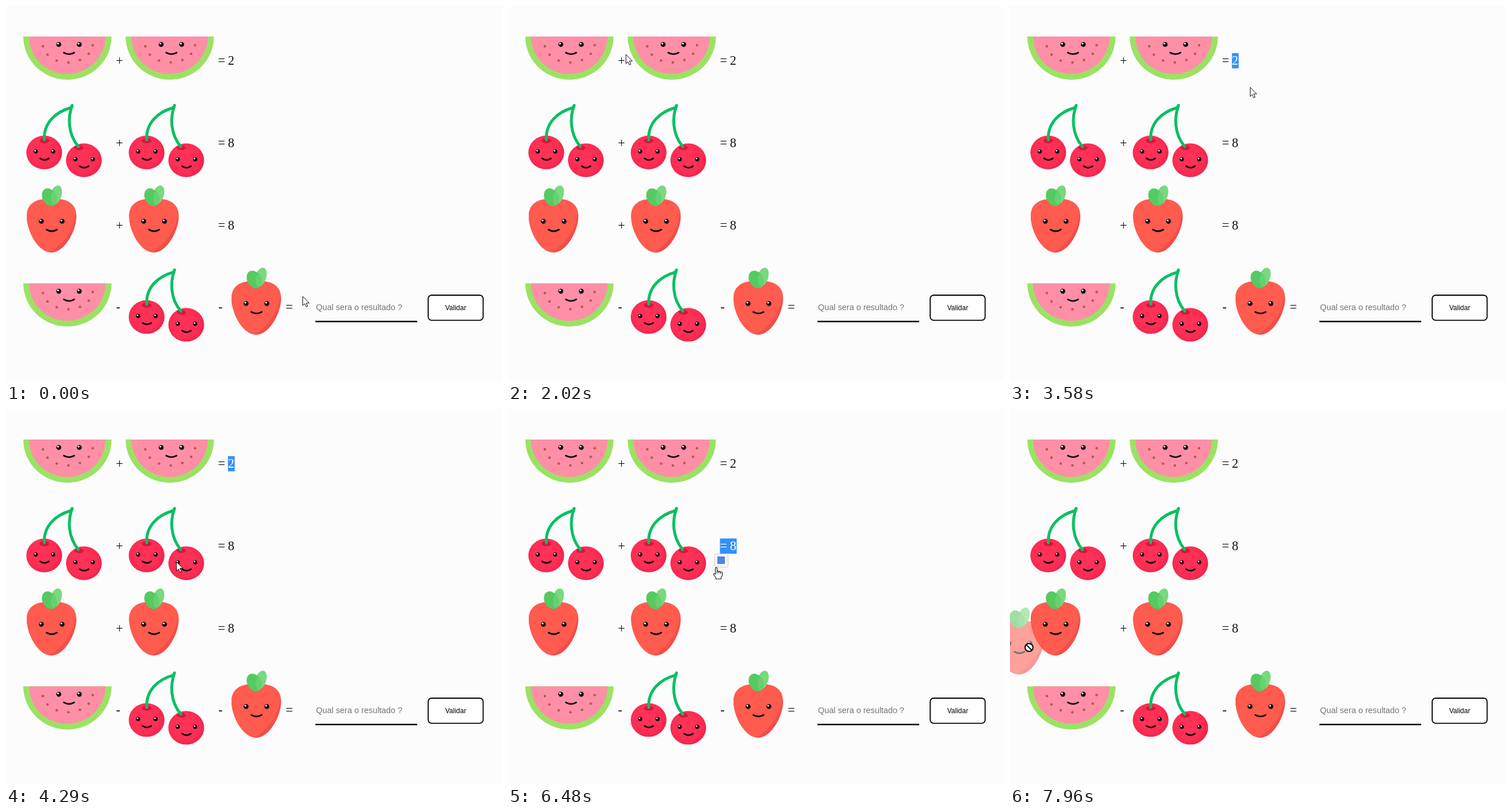
Recreate the animation shown at these times as an HTML page with a canvas. Size 860 px wide and 651 px high, loop 8000 ms.

```html
<!DOCTYPE html>
<html lang="pt">
<head>
<meta charset="utf-8">
<title>Fruit puzzle</title>
<style>
html, body { margin: 0; width: 100%; height: 100%; overflow: hidden; background: #fcfcfd; }
canvas { display: block; }
</style>
</head>
<body>
<canvas id="stage" width="860" height="651"></canvas>
<script>
const W = 860, H = 651, LOOP = 8000;
const COL = 177.5, ROW = 142.8;
const EQUALS_X = 367.5, DIGIT_X = 384.8, DIGIT_END = 396.5;
const SERIF = '22.2px "Liberation Serif", serif';
const SANS = '"Liberation Sans", sans-serif';
const stage = document.getElementById('stage').getContext('2d');

function oval(c, x, y, rx, ry, fill, turn = 0) {
  c.beginPath();
  c.ellipse(x, y, rx, ry, turn, 0, Math.PI * 2);
  c.fillStyle = fill;
  c.fill();
}

function shape(c, path, fill) {
  c.fillStyle = fill;
  c.fill(new Path2D(path));
}

function line(c, path, color, width) {
  c.strokeStyle = color;
  c.lineWidth = width;
  c.lineCap = c.lineJoin = 'round';
  c.stroke(new Path2D(path));
}

function place(c, draw, dx, dy) {
  c.save();
  c.translate(dx, dy);
  draw(c);
  c.restore();
}

// Eyes on both sides of x, with a smile below; size 1 is the larger face.
function face(c, x, y, gap, drop, size) {
  const r = 4.3 * size, half = 9 * size, smile = y + drop;
  for (const side of [-1, 1]) {
    const ex = x + side * gap;
    oval(c, ex, y, r, r, '#100c0e');
    oval(c, ex - r * 0.3, y - r * 0.35, r * 0.36, r * 0.36, '#fff');
  }
  line(c, `M${x - half} ${smile}Q${x} ${smile + 5.4} ${x + half} ${smile}`, '#100c0e', 2.8);
}

function melon(c) {
  shape(c, 'M30 53H183A76.5 75 0 0 1 30 53Z', '#9be264');
  shape(c, 'M40 53H172.5A66.2 65 0 0 1 40 53Z', '#ff8fa6');
  for (let i = 0; i < 7; i++) {
    const a = 0.15 + i * 0.483;
    oval(c, 107 - 43.5 * Math.cos(a), 65 + 33 * Math.sin(a), 2.3, 2.2, '#ad6047');
  }
  face(c, 109.3, 66.7, 17.8, 14.3, 1);
}

function cherry(c, x, y) {
  const g = c.createRadialGradient(x - 4, y - 5, 14, x - 2, y - 2, 34);
  g.addColorStop(0, '#ff3156');
  g.addColorStop(0.65, '#fb2c52');
  g.addColorStop(1, '#ee204c');
  oval(c, x, y, 31, 29.2, g);
  face(c, x + 0.5, y - 1.7, 15.1, 12, 0.84);
}

function cherries(c) {
  cherry(c, 66.3, 254.3);
  cherry(c, 135, 267.8);
  oval(c, 66.5, 234, 8.5, 4.2, '#d5173f');
  oval(c, 126.5, 246, 8, 4.2, '#d5173f', 0.1);
  line(c, 'M66.5 232C65 203 86 184 112.5 176.5L114.8 172.5C107 193 107 222 125.5 244', '#08c062', 5);
}

function strawberry(c) {
  const body = 'M79 336C97 333 122 338 122 365C122 391 101 428 79 428C56 428 36 391 36 365C36 338 61 333 79 336Z';
  shape(c, body, '#f24d4b');
  c.save();
  c.clip(new Path2D(body));
  shape(c, 'M30 330H121V352C122 380 104 410 78 426L30 428Z', '#ff5b4e');
  c.restore();
  oval(c, 86.5, 328, 9.5, 17.2, '#78d97d', 0.32);
  oval(c, 75.3, 332, 12, 16.2, '#55ca61', -0.5);
  oval(c, 83, 334, 5, 11.5, '#66d170', -0.02);
  face(c, 79.3, 373.7, 18, 14.6, 1);
}

function text(c, s, x, y, font = SERIF, color = '#111') {
  c.font = font;
  c.fillStyle = color;
  c.fillText(s, x, y);
}

function result(c, digit, y, color) {
  text(c, '=', EQUALS_X, y, SERIF, color);
  text(c, digit, DIGIT_X, y, SERIF, color);
}

function box(c, x, y, w, h, r, fill, border, width) {
  c.beginPath();
  c.roundRect(x, y, w, h, r);
  c.fillStyle = fill;
  c.fill();
  c.strokeStyle = border;
  c.lineWidth = width;
  c.stroke();
}

const baseline = row => Math.round(102 + row * ROW);

function page(c) {
  c.fillStyle = '#fcfcfd';
  c.fillRect(0, 0, W, H);
  [melon, cherries, strawberry].forEach((fruit, i) => {
    place(c, fruit, 0, 0);
    place(c, fruit, COL, 0);
    place(c, fruit, COL * i, ROW * (3 - i));
    text(c, '+', 190.6, baseline(i));
    result(c, i ? 8 : 2, baseline(i));
  });
  for (const col of [0, 1]) text(c, '-', 190.7 + COL * col, baseline(3));
  text(c, '=', 485, baseline(3));

  text(c, 'Qual sera o resultado ?', 537.5, 528, '14.4px ' + SANS, '#757575');
  c.fillStyle = '#000';
  c.fillRect(536.5, 546.5, 176.5, 2.5);
  box(c, 732, 502, 95.3, 43.6, 6, '#fff', '#000', 1.8);
  text(c, 'Validar', 761.5, 528, '12px ' + SANS, '#000');
}

function layer(draw) {
  const cv = document.createElement('canvas');
  cv.width = W;
  cv.height = H;
  draw(cv.getContext('2d'));
  return cv;
}

const backdrop = layer(page);
const cherryGhost = layer(cherries);
const cherryGhost2 = layer(c => place(c, cherries, COL, 0));
const berryGhost = layer(strawberry);

// Pointer stops: time, x, y. It eases from one to the next.
const STOPS = [
  [0, 514, 504], [130, 514, 504], [930, 597, 520], [1220, 250, 143], [1700, 85, 95],
  [2300, 300, 75], [2740, 378, 100], [3020, 398, 100], [3560, 420, 140],
  [3900, 60, 250], [4290, 295, 265], [4580, 351, 294], [4900, 124, 241],
  [5090, 182, 248], [5550, 412, 238], [5950, 368, 238], [6180, 262, 258],
  [6480, 361, 275], [6800, 458, 278], [7150, 96, 381], [7700, 24, 449],
  [7960, 33, 414], [LOOP, 33, 414]
];

function pointer(t) {
  const i = STOPS.findIndex(stop => stop[0] > t);
  const [t0, x0, y0] = STOPS[i - 1], [t1, x1, y1] = STOPS[i];
  const p = (t - t0) / (t1 - t0), e = p * p * (3 - 2 * p);
  return [x0 + (x1 - x0) * e, y0 + (y1 - y0) * e];
}

// A dragged copy keeps the offset it had when it was grabbed.
const DRAGS = [
  { from: 4310, to: 4600, ghost: cherryGhost2 },
  { from: 4900, to: 5180, ghost: cherryGhost },
  { from: 7150, to: LOOP, ghost: berryGhost }
];

const within = (t, a, b) => t >= a && t < b;

const cursors = {
  arrow(c) {
    const path = 'M.5 .5V16L4 12.7L6.6 18.3L9 17.2L6.5 11.7H11.4Z';
    shape(c, path, '#fff');
    line(c, path, '#111', 1);
  },
  beam(c) {
    line(c, 'M-3 -7H-1L0 -6L1 -7H3M0 -6V6M-3 7H-1L0 6L1 7H3', '#111', 1.2);
  },
  blocked(c) {
    oval(c, 0, 0, 8, 8, '#111');
    oval(c, 0, 0, 5.8, 5.8, '#fff');
    line(c, 'M-4.8 -4.8L4.8 4.8', '#111', 2);
  },
  hand(c) {
    const path = 'M-1.5 1Q0 -1 1.5 1V7Q3 5.5 4.5 7.5Q6 6 7.5 8Q10 7 10.5 9.5V14L8.5 17V20H-.5V18L-4.5 12.5Q-5 9.5 -1.5 11.5Z';
    shape(c, path, '#fff');
    line(c, path + 'M1.5 7V10M4.5 7.5V10M7.5 8V10.5', '#111', 1.1);
  }
};

function cursorKind(t, x, y, dragging) {
  if (dragging) return 'blocked';
  if (within(t, 6400, 6560)) return 'hand';
  const onText = x > 366 && x < 400 && [95, 238].some(mid => Math.abs(y - mid) < 14);
  const onInput = x > 537 && x < 713 && y > 500 && y < 548;
  return onText || onInput ? 'beam' : 'arrow';
}

function highlight(c, from, row, digit) {
  const y = baseline(row);
  c.save();
  c.beginPath();
  c.rect(from, y - 20.3, DIGIT_END - from, 26.5);
  c.clip();
  c.fillStyle = '#3390f8';
  c.fillRect(0, 0, W, H);
  result(c, digit, y, '#fff');
  c.restore();
}

function translateButton(c) {
  box(c, 358.5, 251.5, 23, 23, 3, '#f7f7f8', '#c9c9cd', 1);
  c.fillStyle = '#4a86e0';
  c.fillRect(363, 256, 13, 13);
}

function render(t) {
  const c = stage;
  const [x, y] = pointer(t);
  c.drawImage(backdrop, 0, 0);

  if (within(t, 2900, 5560)) highlight(c, DIGIT_X, 0, 2);
  if (within(t, 5720, 6800)) highlight(c, t > 5900 ? EQUALS_X : DIGIT_X, 1, 8);
  if (within(t, 6120, 6800)) translateButton(c);

  const drag = DRAGS.find(d => within(t, d.from, d.to));
  if (drag) {
    const [gx, gy] = pointer(drag.from);
    c.globalAlpha = 0.56;
    c.drawImage(drag.ghost, Math.round(x - gx), Math.round(y - gy));
    c.globalAlpha = 1;
  }
  place(c, cursors[cursorKind(t, x, y, drag)], Math.round(x), Math.round(y));
}

const start = performance.now();
function tick() {
  render((performance.now() - start) % LOOP);
  requestAnimationFrame(tick);
}
tick();
</script>
</body>
</html>
```
